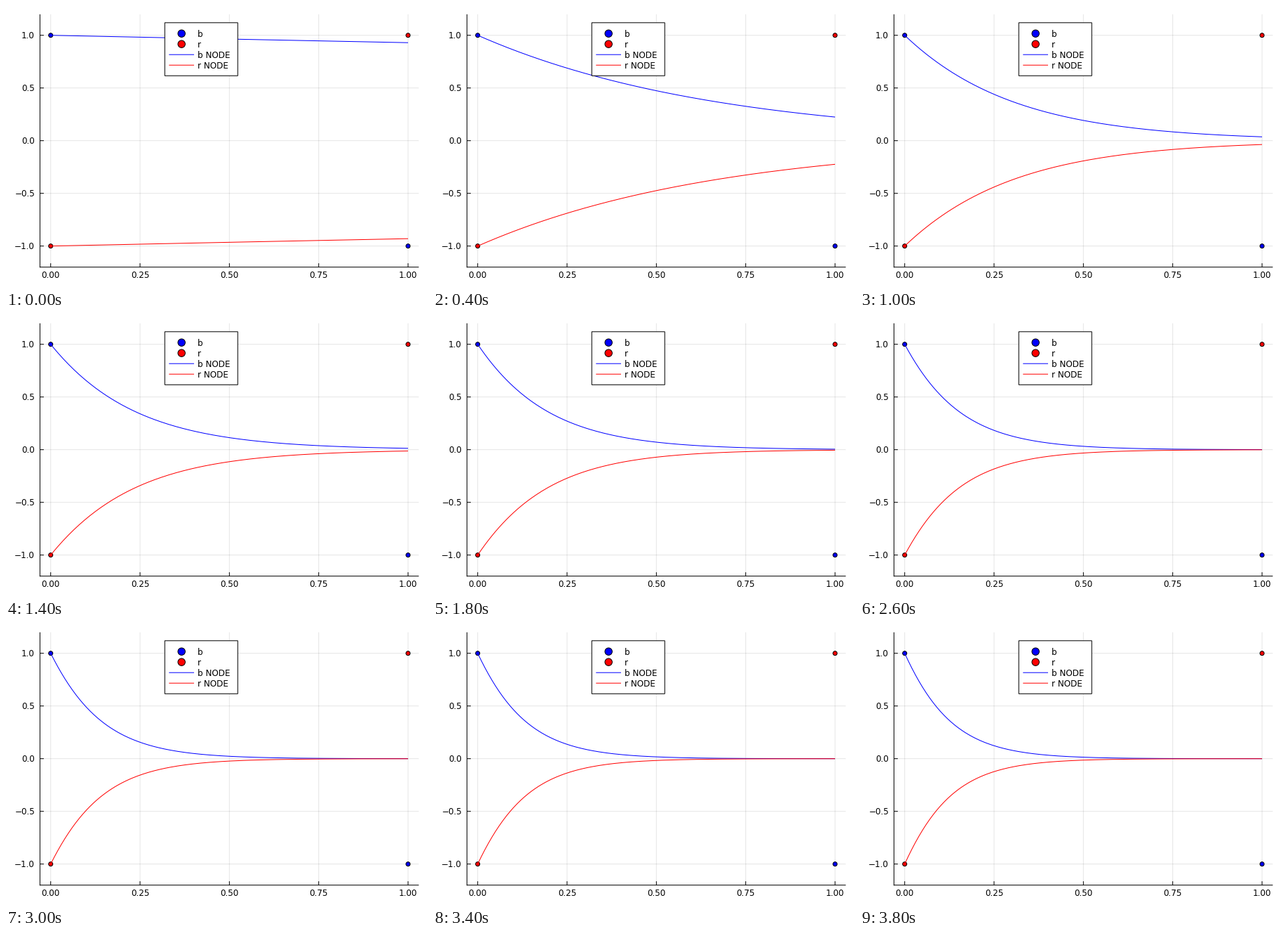
A matplotlib script that plays this animation: 600x400 px, repeating every 4.2 s.

```python
import matplotlib.pyplot as plt
import numpy as np
from matplotlib.animation import FuncAnimation
from matplotlib.patches import Circle, Rectangle

W, H, DPI = 600, 400, 100
PX = 72 / DPI
LEFT, RIGHT, TOP, BOTTOM = 48.4, 588.3, 11.8, 371.7
FRAMES, INTERVAL = 21, 200

plt.rcParams["font.family"] = "DejaVu Sans"
fig = plt.figure(figsize=(W / DPI, H / DPI), dpi=DPI, facecolor="white")
ax = fig.add_axes([0, 0, 1, 1])
ax.set(xlim=(0, W), ylim=(H, 0))
ax.axis("off")


def px(x):
    return 63.7 + 509.3 * x


def py(y):
    return 191.7 - 150 * y


def line(xs, ys, color="black", z=2, **kw):
    return ax.plot(xs, ys, color=color, lw=PX, zorder=z, snap=False,
                   solid_capstyle="butt", **kw)[0]


def dot(x, y, r, color, z=3):
    ax.add_patch(Circle((x, y), r, fc=color, ec="black", lw=PX, zorder=z))


def label(x, y, s, ha):
    ax.text(x, y, s, ha=ha, va="baseline", fontsize=12 * PX, zorder=7)


# Grid, ticks and axes
for v in np.linspace(0, 1, 5):
    x = px(v)
    line([x, x], [TOP, BOTTOM], alpha=0.1, z=1)
    line([x, x], [BOTTOM, BOTTOM - 5.5])
    label(x, 387.3, f"{v:.2f}", "center")
for v in np.linspace(-1, 1, 5):
    y = py(v)
    line([LEFT, RIGHT], [y, y], alpha=0.1, z=1)
    line([LEFT, LEFT + 5.5], [y, y])
    label(41, y + 4.3, f"{v:.1f}".replace("-", "\u2212"), "right")
line([LEFT, LEFT], [TOP, BOTTOM + 0.5])
line([LEFT - 0.5, RIGHT], [BOTTOM, BOTTOM])

# Data points and fitted curves
curves = []
for color, sign in (("blue", 1), ("red", -1)):
    dot(px(0), py(sign), 3, color)
    dot(px(1), py(-sign), 3, color)
    curves.append((sign, line([], [], color, z=4)))

# Legend
ax.add_patch(Rectangle((226.3, 23.8), 104, 75.5, fc="white", ec="black",
                       lw=PX, zorder=5, snap=False))
for i, (color, name) in enumerate((("blue", "b"), ("red", "r"))):
    y = 39.2 + 15 * i
    dot(250.2, y, 5.2, color, z=6)
    label(272.7, y + 4.6, name, "left")
    line([232.3, 268], [y + 30, y + 30], color, z=6)
    label(272.7, y + 34.6, f"{name} NODE", "left")

# Decay rate grows during training, ever more slowly
RATE0 = 0.0726
STEPS = np.array([2, 5, 7, 11, 15, 19])
RATES = np.array([1.5, 3.31, 4.4, 6.25, 7.68, 8.75])
GAIN = np.polyfit(STEPS, (RATES - RATE0) / STEPS, 3)
T = np.linspace(0, 1, 201)


def solve(step):
    """Solution of u' = -a tanh(b u), u(0) = 1, with a * b = rate."""
    rate = RATE0 + step * np.polyval(GAIN, step)
    b = 0.085 * rate
    return np.arcsinh(np.sinh(b) * np.exp(-rate * T)) / b


def update(i):
    u = solve(min(i, FRAMES - 2))
    for sign, curve in curves:
        curve.set_data(px(T), py(sign * u))
    return [curve for _, curve in curves]


anim = FuncAnimation(fig, update, frames=FRAMES, interval=INTERVAL,
                     repeat=True, repeat_delay=0, blit=False)
plt.show()
```
